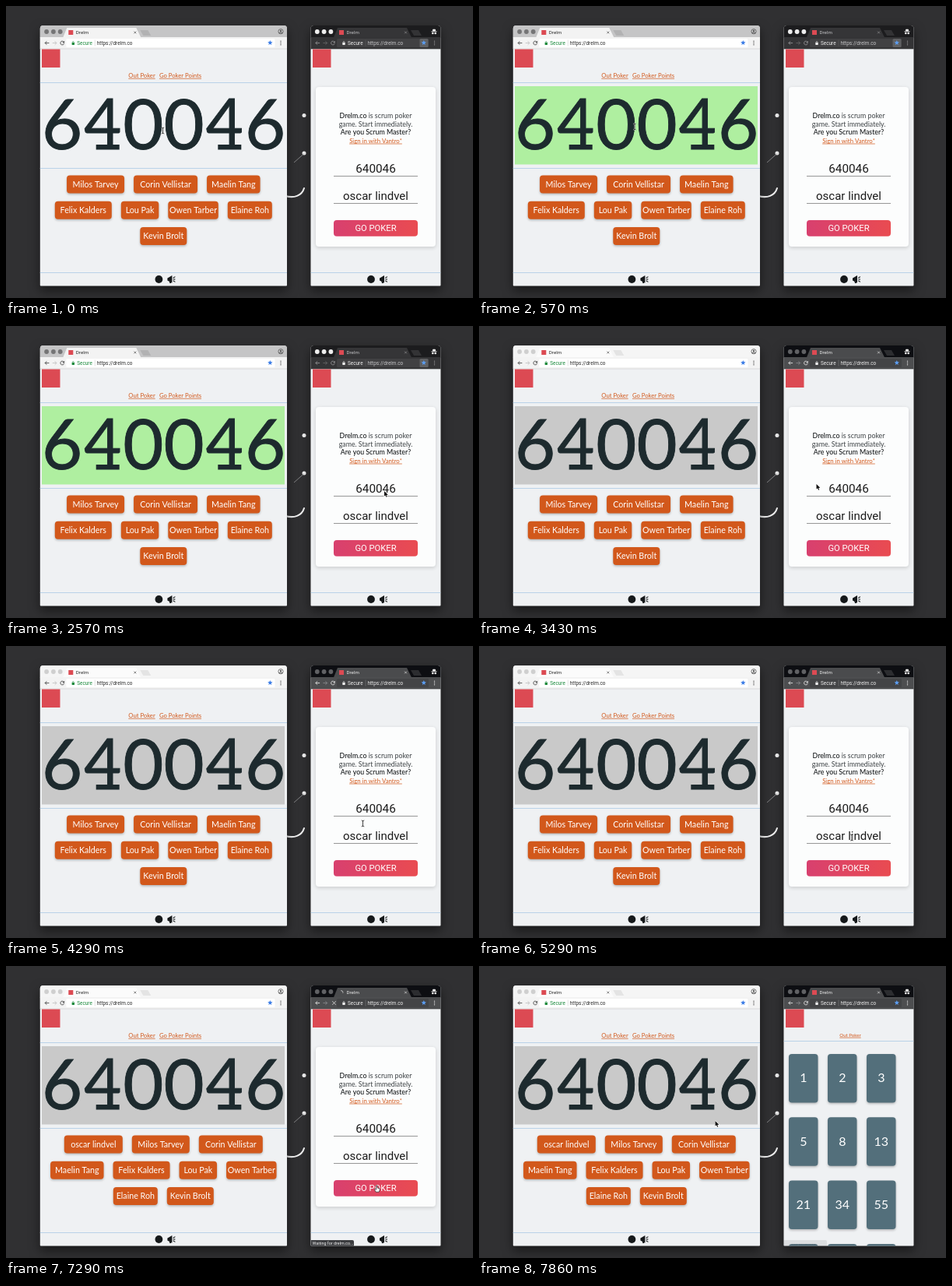
Recreate the animation shown at these times as an HTML page with a canvas. Size 600 by 375 pixels, loop 8000 ms.

```html
<!DOCTYPE html>
<html lang="en">
<head>
<meta charset="utf-8">
<title>Scrum poker</title>
<style>
  html, body { margin: 0; width: 100%; height: 100%; overflow: hidden; background: #303032; }
  canvas { display: block; width: 600px; height: 375px; }
</style>
</head>
<body>
<canvas id="stage"></canvas>
<script>
const LOOP = 8000, STEP = 1000 / 7;
const ACTIVATE = 2860, JOINED = 6860, LOADED = 7570;
const BRAND = 'Drelm', SITE = 'drelm.co', PLAYER = 'oscar lindvel', ROOM = '640046';
const ROUND = 'Lato, sans-serif', UI = 'Roboto, sans-serif';
const RED = '#dc4a53', ORANGE = '#d2581b', PAGE = '#eff1f3', RULE = '#b9d2e8', INK = '#1d2a2e';

// Each player: name and width of the label box.
const PLAYERS = [
  ['Milos Tarvey', 74], ['Corin Vellistar', 82], ['Maelin Tang', 68.5],
  ['Felix Kalders', 73], ['Lou Pak', 48.5], ['Owen Tarber', 64.5],
  ['Elaine Roh', 57], ['Kevin Brolt', 60]
];

// Pointer path: time, x, y.
const PATH = [
  [0, 201.5, 160], [290, 201, 158], [430, 201, 158], [570, 200, 155], [1000, 200, 155],
  [2000, 484, 209], [2570, 486, 212], [2860, 486, 212], [3430, 433.5, 203],
  [3710, 434, 204], [4710, 474, 243], [5000, 474, 243], [5290, 479, 246],
  [6000, 477, 281], [6710, 477, 286], [7290, 477, 286], [7860, 303.5, 199]
];

const canvas = document.getElementById('stage');
const ctx = canvas.getContext('2d');
const scale = window.devicePixelRatio || 1;
canvas.width = 600 * scale;
canvas.height = 375 * scale;

function rect(x, y, w, h, fill, radius = 0) {
  ctx.fillStyle = fill;
  ctx.beginPath();
  ctx.roundRect(x, y, w, h, radius);
  ctx.fill();
}

function disc(x, y, r, fill) {
  ctx.fillStyle = fill;
  ctx.beginPath();
  ctx.arc(x, y, r, 0, Math.PI * 2);
  ctx.fill();
}

function trace(points) {
  ctx.beginPath();
  points.forEach(([x, y]) => ctx.lineTo(x, y));
}

function line(points, color, width = 1) {
  trace(points);
  ctx.strokeStyle = color;
  ctx.lineWidth = width;
  ctx.stroke();
}

function poly(points, fill) {
  trace(points);
  ctx.closePath();
  ctx.fillStyle = fill;
  ctx.fill();
}

function arc(x, y, r, from, to, color, width) {
  ctx.beginPath();
  ctx.arc(x, y, r, from, to);
  ctx.strokeStyle = color;
  ctx.lineWidth = width;
  ctx.stroke();
}

function text(str, x, y, font, color, align = 'left') {
  ctx.font = font;
  ctx.fillStyle = color;
  ctx.textAlign = align;
  ctx.fillText(str, x, y);
}

function link(str, x, y, size) {
  text(str, x, y, `${size}px ${ROUND}`, ORANGE, 'center');
  const half = ctx.measureText(str).width / 2;
  line([[x - half, y + 1.3], [x + half, y + 1.3]], ORANGE, 0.7);
}

function shadowed(color, blur, dy, draw) {
  ctx.save();
  ctx.shadowColor = color;
  ctx.shadowBlur = blur * scale;
  ctx.shadowOffsetY = dy * scale;
  draw();
  ctx.restore();
}

function star(x, y, r, fill) {
  const points = Array.from({ length: 10 }, (_, i) => {
    const a = i * Math.PI / 5 - Math.PI / 2, d = i % 2 ? r * 0.45 : r;
    return [x + Math.cos(a) * d, y + Math.sin(a) * d];
  });
  poly(points, fill);
}

function arrowIcon(x, y, dir, color) {
  line([[x - 2.6, y], [x + 2.6, y]], color, 0.9);
  line([[x + dir * 0.4, y - 2.3], [x + dir * 2.7, y], [x + dir * 0.4, y + 2.3]], color, 0.9);
}

function crossIcon(x, y, r, color, width) {
  line([[x - r, y - r], [x + r, y + r]], color, width);
  line([[x - r, y + r], [x + r, y - r]], color, width);
}

function reloadIcon(x, y, color) {
  arc(x, y, 2.4, 0.3, 5.4, color, 0.9);
  poly([[x + 2.8, y - 2.8], [x + 2.8, y], [x, y - 0.2]], color);
}

function lockIcon(x, y, color) {
  rect(x - 1.7, y - 0.6, 3.4, 3, color, 0.4);
  arc(x, y - 0.8, 1.1, Math.PI, 0, color, 0.7);
}

function decorations() {
  disc(383, 140.5, 2.5, '#f4f4f4');
  disc(383, 189, 2.5, '#f4f4f4');
  line([[370, 201], [383, 189.5]], '#a5a5a6', 0.7);
  ctx.beginPath();
  ctx.moveTo(359, 244);
  ctx.bezierCurveTo(370, 247, 380, 244, 383, 234);
  ctx.strokeStyle = '#f2f2f2';
  ctx.lineWidth = 2.1;
  ctx.lineCap = 'round';
  ctx.stroke();
  ctx.lineCap = 'butt';
}

function browser(x, w, theme, loading, spin) {
  const right = x + w, tab = x + 30.5;
  shadowed('rgba(0,0,0,.5)', 14, 6, () => rect(x, 25, w, 334.5, PAGE, [4, 4, 1, 1]));
  rect(x, 25, w, 15.5, theme.strip, [4, 4, 0, 0]);
  for (let i = 0; i < 3; i++) disc(x + 8.3 + i * 8.8, 33, 2.9, theme.lights);

  poly([[tab - 1, 40.2], [tab + 4, 28], [tab + 93, 28], [tab + 99, 40.2]], theme.tab);
  if (loading) arc(tab + 8.5, 34, 2.4, spin, spin + 2, '#d8d8d8', 0.8);
  else rect(tab + 6, 31, 6, 6, RED);
  text(BRAND, tab + 15.5, 36.2, `6.2px ${UI}`, theme.label);
  crossIcon(tab + 91.5, 34, 1.4, theme.icon, 0.7);
  poly([[tab + 98, 31], [tab + 108, 31], [tab + 112, 38], [tab + 102, 38]], theme.button);

  rect(x, 40, w, 15, theme.bar);
  line([[x, 55], [right, 55]], theme.edge, 0.6);
  rect(x + 33.5, 42, w - 49, 11, theme.field, 1.5);
  arrowIcon(x + 9, 47.5, -1, theme.icon);
  arrowIcon(x + 18.5, 47.5, 1, theme.faint);
  if (loading) crossIcon(x + 30, 47.5, 2.2, theme.icon, 0.9);
  else reloadIcon(x + 28.5, 47.5, theme.icon);
  const address = x + 42.5;
  lockIcon(address, 47.5, theme.secure);
  text('Secure', address + 5, 49.8, `6.4px ${UI}`, theme.secure);
  line([[address + 28, 43.5], [address + 28, 51.5]], theme.faint, 0.5);
  text('https://' + SITE, address + 30.5, 49.8, `6.4px ${UI}`, theme.label);
  rect(right - 27, 42, 11, 11, theme.starBox, 1.5);
  star(right - 21.7, 47.3, 3.3, theme.star);
  for (let i = -1; i <= 1; i++) disc(right - 8, 47.5 + i * 2.2, 0.7, theme.icon);
}

function hatIcon(x, y) {
  rect(x - 1.9, y - 3.2, 3.8, 2.6, '#f0f0f0', 0.6);
  rect(x - 3.5, y - 0.7, 7, 0.9, '#f0f0f0');
  disc(x - 1.7, y + 2, 1.3, '#f0f0f0');
  disc(x + 1.7, y + 2, 1.3, '#f0f0f0');
}

function profileIcon(x, y) {
  arc(x, y, 3.1, 0, Math.PI * 2, '#555', 0.8);
  disc(x, y - 0.8, 1.1, '#555');
  arc(x, y + 2.6, 1.6, Math.PI, 0, '#555', 1);
}

function footer(x, w) {
  const mid = x + w / 2, black = '#15181a';
  line([[x, 342.5], [x + w, 342.5]], RULE);
  disc(mid - 6, 351, 4.9, black);
  const m = mid + 7;
  poly([[m - 1, 349], [m + 4, 346], [m + 4, 355.5], [m - 1, 353]], black);
  rect(m - 2, 349, 3.5, 4, black, 1);
  poly([[m, 352], [m + 2, 352], [m + 3, 356], [m + 1, 356]], black);
  for (let i = -1; i <= 1; i++) {
    line([[m + 5.3, 351 + i * 1.8], [m + 8, 351 + i * 3.4]], black, 1.1);
  }
}

function playerRows(players) {
  const gap = 12, rows = [];
  let room = 0;
  for (const player of players) {
    if (room < player[1]) {
      rows.push([]);
      room = 310;
    }
    rows[rows.length - 1].push(player);
    room -= player[1] + gap;
  }
  rows.forEach((row, i) => {
    const total = row.reduce((sum, p) => sum + p[1] + gap, -gap);
    let x = 202.3 - total / 2;
    const y = 217.5 + i * 33.3;
    for (const [name, w] of row) {
      shadowed('rgba(0,0,0,.25)', 3, 1.5, () => rect(x, y, w, 23, ORANGE, 4));
      text(name, x + w / 2, y + 15.3, `10.7px ${ROUND}`, '#fff', 'center');
      x += w + gap;
    }
  });
}

function roomNumber() {
  const advance = 52.2, base = 184;
  ctx.strokeStyle = INK;
  ctx.lineWidth = 0.9;
  [...ROOM].forEach((digit, i) => {
    const x = 202.5 + (i - 2.5) * advance;
    // A four stands on a slab foot, so its glyph is shorter.
    const slab = digit === '4';
    const size = slab ? 83 : 90, y = slab ? base - 5 : base;
    text(digit, x, y, `${size}px ${ROUND}`, INK, 'center');
    ctx.strokeText(digit, x, y);
    if (slab) rect(x - 8.5, base - 6, 30, 6.5, INK);
  });
}

function leftWindow(t) {
  const active = t < ACTIVATE, x = 43.8, w = 317.2;
  browser(x, w, {
    strip: active ? '#c5c5c6' : '#f5f5f5', tab: active ? '#f3f3f3' : '#fbfbfb',
    lights: active ? '#757576' : '#cfcfcf', button: active ? '#b2b2b3' : '#e4e4e4',
    bar: '#f3f3f3', field: '#fff', edge: '#c9cacb', icon: '#4c4c4c', faint: '#c4c4c4',
    label: '#2b2b2b', secure: '#1a8a3c', star: '#3c7de6', starBox: '#fff'
  }, false, 0);
  profileIcon(353, 32.7);
  rect(46, 55.5, 23.5, 23.5, RED);
  link('Out Poker', 174.5, 92, 7.7);
  link('Go Poker Points', 224, 92, 7.7);
  line([[x, 98.5], [x + w, 98.5]], RULE);
  line([[x, 208.5], [x + w, 208.5]], RULE);
  if (t >= 4 * STEP) rect(46, 103, 312, 100.5, active ? '#afefa0' : '#c9c9c9');
  roomNumber();
  playerRows(t < JOINED ? PLAYERS : [[PLAYER, 75], ...PLAYERS]);
  footer(x, w);
}

function signIn() {
  const mid = 475;
  shadowed('rgba(0,0,0,.16)', 5, 1.5, () => rect(398, 104, 154, 205, '#fcfdfd', 4));

  const lead = BRAND + '.co', rest = ' is scrum poker';
  const regular = `8.8px ${ROUND}`, medium = `500 8.8px ${ROUND}`;
  ctx.font = medium;
  const leadWidth = ctx.measureText(lead).width;
  ctx.font = regular;
  const start = mid - (leadWidth + ctx.measureText(rest).width) / 2;
  text(lead, start, 144.3, medium, '#16191b');
  text(rest, start + leadWidth, 144.3, regular, '#3c4144');
  text('game. Start immediately.', mid, 154.8, regular, '#3c4144', 'center');
  text('Are you Scrum Master?', mid, 165.3, medium, '#16191b', 'center');
  link('Sign in with Vantro*', mid, 175.7, 7.8);

  text(ROOM, mid, 213.8, `15.3px ${UI}`, '#1c1c1c', 'center');
  text(PLAYER, mid, 248.8, `15px ${UI}`, '#1c1c1c', 'center');
  line([[421, 218.5], [529, 218.5]], '#8c8c8c', 0.9);
  line([[421, 253.5], [529, 253.5]], '#8c8c8c', 0.9);

  const pink = ctx.createLinearGradient(421, 0, 529, 0);
  pink.addColorStop(0, '#d8406f');
  pink.addColorStop(1, '#e94b51');
  rect(421, 275, 108, 20.7, pink, 4);
  text('GO POKER', mid, 289.2, `11.2px ${UI}`, '#fff', 'center');
  footer(391.5, 167);
}

function pokerCards() {
  link('Out Poker', 477, 90.8, 6.1);
  line([[391.5, 96.5], [558.5, 96.5]], RULE);
  let a = 1, b = 2;
  for (let i = 0; i < 12; i++) {
    const x = 398 + (i % 3) * 50, y = 113 + Math.floor(i / 3) * 81.3;
    shadowed('rgba(0,0,0,.25)', 3, 1.5, () => rect(x, y, 37.5, 62.5, '#536f7b', 4));
    text(a, x + 18.8, y + 36.3, `16px ${ROUND}`, '#fff', 'center');
    [a, b] = [b, a + b];
  }
}

function rightWindow(t) {
  const active = t >= ACTIVATE, loading = t >= JOINED && t < LOADED;
  browser(391.5, 167, {
    strip: active ? '#0d0e12' : '#1c1c1e', tab: active ? '#4a4b4d' : '#353537',
    lights: active ? '#606164' : '#ededed', button: active ? '#2c2d30' : '#333335',
    bar: active ? '#4d4e50' : '#343436', field: active ? '#434446' : '#414143',
    edge: '#38393b', icon: active ? '#dcdcdc' : '#8e8e90', faint: active ? '#85868a' : '#626264',
    label: active ? '#ececec' : '#c4c4c6', secure: '#f0f0f0',
    star: '#5b9cf0', starBox: active ? '#434446' : '#606163'
  }, loading, t / 150);
  hatIcon(550, 33);

  ctx.save();
  ctx.beginPath();
  ctx.rect(391.5, 55, 167, 304.5);
  ctx.clip();
  rect(394, 55.5, 23.5, 23.5, RED);
  if (t < LOADED) signIn();
  else pokerCards();
  if (t >= JOINED) {
    ctx.globalAlpha = t < LOADED ? 1 : Math.max(0.1, 1 - (t - LOADED + STEP) / 480);
    rect(391.5, 352, 55.5, 8, '#3c3d40', [0, 2, 0, 0]);
    text(`Waiting for ${SITE}...`, 393.5, 357.7, `5.4px ${UI}`, '#f2f2f2');
  }
  ctx.restore();
}

function pointerAt(t) {
  const next = PATH.findIndex(key => key[0] > t);
  if (next < 0) return PATH[PATH.length - 1].slice(1);
  const [t0, x0, y0] = PATH[next - 1], [t1, x1, y1] = PATH[next];
  const u = (t - t0) / (t1 - t0), ease = u * u * (3 - 2 * u);
  return [x0 + (x1 - x0) * ease, y0 + (y1 - y0) * ease];
}

function beam(x, y) {
  for (const [color, width] of [['rgba(255,255,255,.7)', 1.8], ['#111', 0.8]]) {
    line([[x, y - 3.5], [x, y + 3.5]], color, width);
    line([[x - 1.7, y - 4], [x, y - 3.3], [x + 1.7, y - 4]], color, width);
    line([[x - 1.7, y + 4], [x, y + 3.3], [x + 1.7, y + 4]], color, width);
  }
}

function arrow(x, y) {
  const shape = [[0, 0], [0, 6.6], [1.5, 5.3], [2.6, 7.7], [3.7, 7.2], [2.7, 4.9], [4.8, 4.8], [0, 0]]
    .map(([dx, dy]) => [x + dx, y + dy]);
  line(shape, '#fff', 1.1);
  poly(shape, '#111');
}

function hand(x, y) {
  const shape = [[-1.4, -4], [0, -4], [0.2, -1], [3.2, -0.2], [3.2, 2], [2.2, 4.2], [-1.8, 4.2],
    [-3.6, 1], [-2.8, 0.2], [-1.4, 1.2], [-1.4, -4]].map(([dx, dy]) => [x + dx, y + dy]);
  poly(shape, '#fff');
  line(shape, '#222', 0.7);
}

function pointer(t) {
  const [x, y] = pointerAt(t);
  const overNumber = t < 2000 && x < 361;
  const overField = t > 3500 && t < 6500 && y < 256;
  if (overNumber || overField) beam(x, y);
  else if (t > 5000 && x > 420 && y > 274) hand(x, y);
  else arrow(x, y);
}

function draw(now) {
  const t = Math.floor(((now + 8) % LOOP) / STEP) * STEP;
  ctx.setTransform(scale, 0, 0, scale, 0, 0);
  rect(0, 0, 600, 375, '#303032');
  decorations();
  leftWindow(t);
  rightWindow(t);
  pointer(t);
}

let origin;
function tick(now) {
  origin ??= now;
  draw(now - origin);
  requestAnimationFrame(tick);
}
requestAnimationFrame(tick);
</script>
</body>
</html>
```
